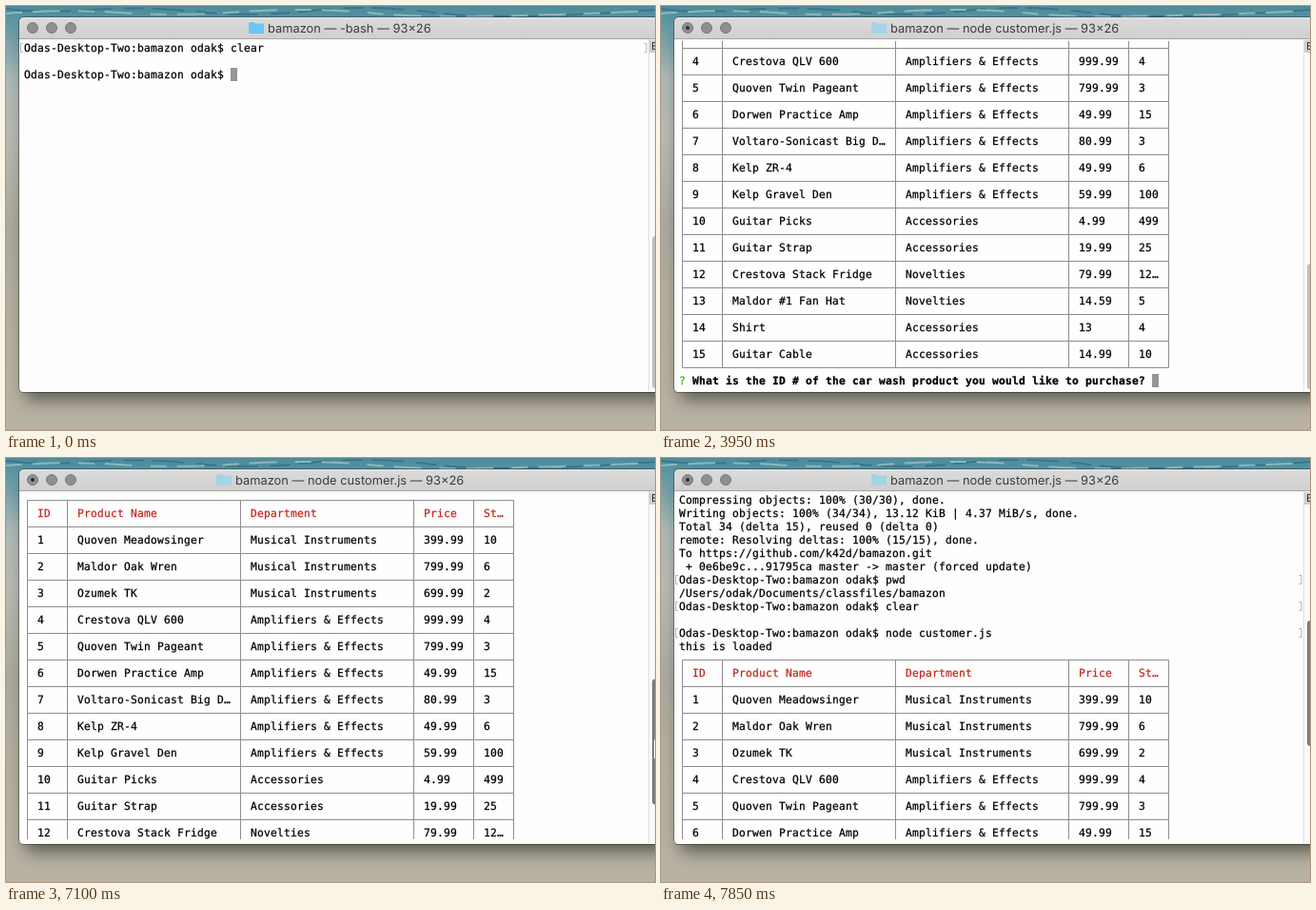
Recreate the animation shown at these times as an HTML page. Size 682 by 446 pixels, loop 8000 ms.

```html
<!DOCTYPE html>
<html lang="en">
<head>
<meta charset="utf-8">
<title>Terminal</title>
<style>
  html, body { margin: 0; width: 100%; height: 100%; overflow: hidden; }
  svg { display: block; width: 100vw; height: 100vh; }
  text { white-space: pre; text-rendering: geometricPrecision; }
  #screen { font: 11.3px "DejaVu Sans Mono", "Liberation Mono", monospace; }
  #screen text { stroke: currentColor; stroke-width: .25px; }
  #title { font: 12.85px Inter, "Open Sans", sans-serif; fill: #3c3c3c; }
</style>
</head>
<body>
<svg viewBox="0 0 682 446" xmlns="http://www.w3.org/2000/svg">
  <defs>
    <linearGradient id="beach" x2="0" y2="1">
      <stop offset="0" stop-color="#4d8b9b"/>
      <stop offset=".03" stop-color="#5a95a3"/>
      <stop offset=".1" stop-color="#83a7ac"/>
      <stop offset=".17" stop-color="#adb9b6"/>
      <stop offset=".3" stop-color="#b9bab2"/>
      <stop offset=".52" stop-color="#acaa9e"/>
      <stop offset=".75" stop-color="#b4afa0"/>
      <stop offset="1" stop-color="#b7b2a3"/>
    </linearGradient>
    <linearGradient id="bar" x2="0" y2="1">
      <stop offset="0" stop-color="#dcdbdc"/>
      <stop offset="1" stop-color="#d0cfd0"/>
    </linearGradient>
    <filter id="blur" x="-10%" y="-10%" width="120%" height="125%"><feGaussianBlur stdDeviation="9"/></filter>
    <clipPath id="view"><rect x="14" y="37" width="661" height="364"/></clipPath>
  </defs>

  <rect width="682" height="446" fill="url(#beach)"/>
  <g fill="none" stroke-width="2">
    <path d="M0 3q40 5 90 1t110 2 120-1 130 2 232-3" stroke="#39788b" stroke-dasharray="34 13 21 9"/>
    <path d="M0 8q60-5 120-1t130-1 140 2 292-3" stroke="#8fb8be" stroke-dasharray="17 11 29 19"/>
  </g>
  <rect x="20" y="24" width="720" height="390" rx="6" opacity=".5" filter="url(#blur)"/>

  <path d="M14 406V17q0-5 5-5H682V406H18q-4 0-4-4z" fill="#fefefe"/>
  <path d="M14 35V17q0-5 5-5H682V35z" fill="url(#bar)"/>
  <path d="M18 12.5H682" stroke="#ececec"/>
  <path d="M14 34.5H682" stroke="#a5a5a5"/>
  <path d="M13.5 402V17q0-5.500 5.500-5.500H682M14 402q0 4.500 4 4.500H682" fill="none" stroke="#000" stroke-opacity=".3"/>
  <g fill="#8f8e92" stroke="#77767a">
    <circle cx="28" cy="23" r="5.500"/><circle cx="48" cy="23" r="5.500"/><circle cx="68" cy="23" r="5.500"/>
  </g>
  <circle id="busy" cx="28" cy="23" r="2" fill="#2e2e30"/>
  <path id="folder" d="M0 2q0-1 1-1h4.500l1.500 1.500h8q1 0 1 1V12q0 1-1 1H1q-1 0-1-1z"/>
  <text id="title" y="28"></text>

  <g clip-path="url(#view)"><g id="screen"></g></g>

  <rect x="675" y="35" width="7" height="370" fill="#fafafa"/>
  <path d="M675.500 35V405" stroke="#e0e0e0"/>
  <rect x="676" y="36" width="8" height="13" fill="#cfcfcf"/>
  <path d="M682 38.500h-2.500v7H682M679.500 42H682" fill="none" stroke="#333"/>
  <rect id="thumb" x="679" width="8" rx="3.500"/>
  <g id="beam" fill="none" stroke-linecap="round">
    <path d="M-3.500-7.500Q0-7.500 0-5Q0-7.500 3.500-7.500M0-5V5M-3.500 7.500Q0 7.500 0 5Q0 7.500 3.500 7.500M-1.500 3H1.500" stroke="#fff" stroke-width="3"/>
    <path d="M-3.500-7.500Q0-7.500 0-5Q0-7.500 3.500-7.500M0-5V5M-3.500 7.500Q0 7.500 0 5Q0 7.500 3.500 7.500M-1.500 3H1.500" stroke="#111" stroke-width="1.200"/>
  </g>
  <path id="arrow" d="M0 0V16L4 12.500L6.500 18L9 17L6.500 11.500H11z" fill="#111" stroke="#fff" stroke-width="2"/>
</svg>

<script>
const LOOP = 8000, CELL = 7, LINE = 14, LEFT = 19, TOP = 37;
const PROMPT = 'Odas-Desktop-Two:bamazon odak$ ';
const COMMAND = 12, FIRST_BORDER = 14, ASK = 47;
const $ = id => document.getElementById(id);

const log = [
  'Counting objects: 100% (34/34), done.',
  'Delta compression using up to 8 threads',
  'Compressing objects: 100% (30/30), done.',
  'Writing objects: 100% (34/34), 13.12 KiB | 4.37 MiB/s, done.',
  'Total 34 (delta 15), reused 0 (delta 0)',
  'remote: Resolving deltas: 100% (15/15), done.',
  'To https://github.com/k42d/bamazon.git',
  ' + 0e6be9c...91795ca master -> master (forced update)',
  PROMPT + 'pwd',
  '/Users/odak/Documents/classfiles/bamazon',
  PROMPT + 'clear'
];

const MUSIC = 'Musical Instruments', AMPS = 'Amplifiers & Effects', EXTRAS = 'Accessories', FUN = 'Novelties';
const products = [
  ['Quoven Meadowsinger', MUSIC, '399.99', '10'],
  ['Maldor Oak Wren', MUSIC, '799.99', '6'],
  ['Ozumek TK', MUSIC, '699.99', '2'],
  ['Crestova QLV 600', AMPS, '999.99', '4'],
  ['Quoven Twin Pageant', AMPS, '799.99', '3'],
  ['Dorwen Practice Amp', AMPS, '49.99', '15'],
  ['Voltaro-Sonicast Big D…', AMPS, '80.99', '3'],
  ['Kelp ZR-4', AMPS, '49.99', '6'],
  ['Kelp Gravel Den', AMPS, '59.99', '100'],
  ['Guitar Picks', EXTRAS, '4.99', '499'],
  ['Guitar Strap', EXTRAS, '19.99', '25'],
  ['Crestova Stack Fridge', FUN, '79.99', '12…'],
  ['Maldor #1 Fan Hat', FUN, '14.59', '5'],
  ['Shirt', EXTRAS, '13', '4'],
  ['Guitar Cable', EXTRAS, '14.99', '10']
];

function add(parent, tag, attrs = {}) {
  const el = document.createElementNS('http://www.w3.org/2000/svg', tag);
  for (const key in attrs) el.setAttribute(key, attrs[key]);
  return parent.appendChild(el);
}

// Places each character on the terminal's cell grid.
function setText(el, str, col) {
  if (el.textContent === str) return;
  el.textContent = str;
  el.setAttribute('x', Array.from(str, (_, i) => LEFT + (col + i) * CELL).join(' '));
}

function print(parent, str, line, col = 0, color = '#000', weight = 'normal') {
  const el = add(parent, 'text', {
    y: TOP + line * LINE + 11, color, fill: 'currentColor', 'font-weight': weight
  });
  setText(el, str, col);
  return el;
}

function bracket(parent, line) {
  const y = TOP + line * LINE + 2.5;
  return add(parent, 'path', {
    d: `M18 ${y}h-2.500v9h2.500M670.500 ${y}h2.500v9h-2.500`, fill: 'none', stroke: '#b0b0b0'
  });
}

function drawTable(parent) {
  const mid = line => TOP + line * LINE + 7.5;
  const edges = [0, 6, 32, 58, 67, 73].map(c => LEFT + c * CELL + 3.5);
  const last = FIRST_BORDER + 2 * (products.length + 1);
  let d = '';
  for (let line = FIRST_BORDER; line <= last; line += 2) d += `M${edges[0]} ${mid(line)}H${edges[5]}`;
  for (const x of edges) d += `M${x} ${mid(FIRST_BORDER)}V${mid(last)}`;
  add(parent, 'path', { d, stroke: '#8e8e8e' });

  const cols = [2, 8, 34, 60, 69];
  const row = (cells, line, color) => cells.forEach((s, i) => print(parent, s, line, cols[i], color));
  row(['ID', 'Product Name', 'Department', 'Price', 'St…'], FIRST_BORDER + 1, '#c3291c');
  products.forEach((p, i) => row([i + 1 + '', ...p], FIRST_BORDER + 3 + 2 * i));
}

const screen = $('screen');
const cursor = add(screen, 'rect', { width: CELL, height: LINE, fill: '#959595' });
log.forEach((s, i) => {
  print(screen, s, i);
  if (s.startsWith(PROMPT)) bracket(screen, i);
});
const command = print(screen, PROMPT, COMMAND);
const entered = bracket(screen, COMMAND);
const loaded = print(screen, 'this is loaded', COMMAND + 1);
const result = add(screen, 'g');
drawTable(result);
print(result, '?', ASK, 0, '#35b52c');
const question = 'What is the ID # of the car wash product you would like to purchase?';
print(result, question, ASK, 2, '#000', 'bold');

const typing = [
  [0, ''], [500, 'ndo'], [650, 'ndoe '], [1100, 'ndoe'], [1250, 'nd'], [1400, 'n'],
  [1550, 'no'], [1700, 'node'], [1850, 'node '], [2450, 'node c'], [2600, 'node cus'],
  [2750, 'node custo'], [2900, 'node custome'], [3050, 'node customer.'], [3200, 'node customer.js']
];
const pointer = [
  [0, null], [5150, [628, 279]], [5300, [629, 299]], [5450, [632, 320]], [5600, [643, 334]],
  [5750, [658, 341]], [5900, [670, 345]], [6200, [671, 349]], [6350, [672, 352]],
  [6500, [671, 354]], [6650, null]
];
// Scroll position in lines; the view snaps to whole lines.
const scroll = [
  [0, 10], [3950, 22], [6800, 20.3], [6950, 18.2], [7100, 14.4], [7250, 6.3],
  [7400, 0], [7550, .6], [7700, 1.4], [7850, 2.35]
];
const at = (steps, t) => steps.findLast(s => s[0] <= t)[1];
const show = (el, on) => el.setAttribute('visibility', on ? 'visible' : 'hidden');
const move = (el, x, y) => el.setAttribute('transform', `translate(${x} ${y})`);

function render(t) {
  const typed = at(typing, t), pos = at(scroll, t), beam = at(pointer, t);
  const running = t >= 3650, printed = t >= 3800, listed = t >= 3950, dragging = t >= 6650;

  setText(command, PROMPT + typed, 0);
  move(screen, 0, -LINE * Math.floor(pos));
  show(entered, running);
  show(loaded, printed);
  show(result, listed);

  const [line, col] = listed ? [ASK, question.length + 3]
    : printed ? [COMMAND + 2, 0]
    : running ? [COMMAND + 1, 0]
    : [COMMAND, PROMPT.length + typed.length];
  cursor.setAttribute('x', LEFT + col * CELL);
  cursor.setAttribute('y', TOP + line * LINE);

  const icon = running ? 221 : 255;
  $('title').textContent = `bamazon — ${running ? 'node customer.js' : '-bash'} — 93×26`;
  $('title').setAttribute('x', icon + 20);
  move($('folder'), icon, 16);
  $('folder').setAttribute('fill', running ? '#a6d3e8' : '#6cc5f2');
  show($('busy'), running);

  const thumbTop = listed ? 159 + 5.1 * pos : 242;
  $('thumb').setAttribute('y', thumbTop);
  $('thumb').setAttribute('height', listed ? 132 : 160);
  $('thumb').setAttribute('fill', dragging ? '#7c7c7c' : '#c1c1c1');

  show($('beam'), beam);
  if (beam) move($('beam'), ...beam);
  show($('arrow'), dragging && t < 7550);
  move($('arrow'), 682, thumbTop + 66);
}

const start = performance.now();
function tick() {
  render((performance.now() - start) % LOOP);
  requestAnimationFrame(tick);
}
tick();
</script>
</body>
</html>
```
